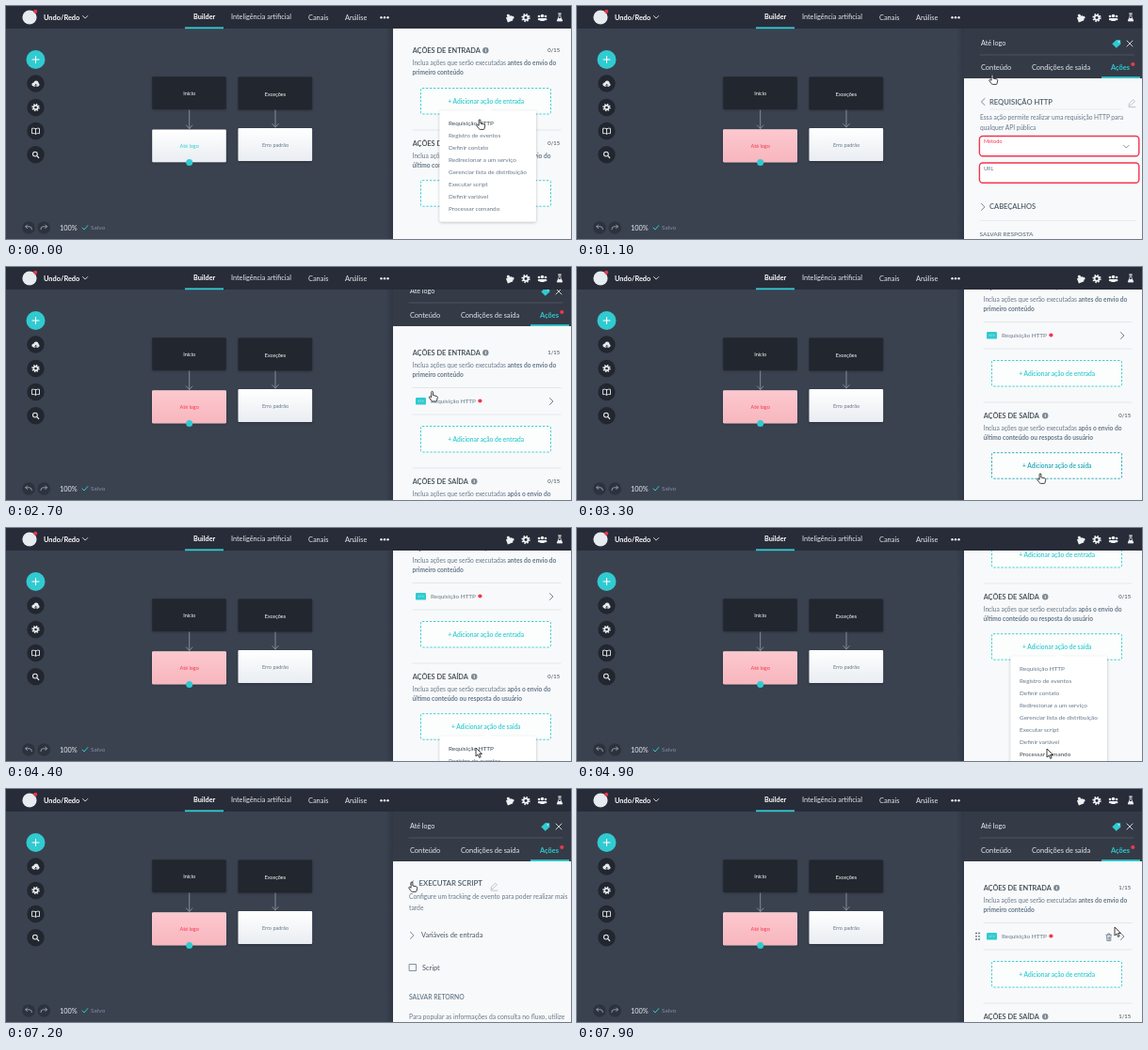
Write an HTML page that moves like this. It is 600 px wide and 248 px high and loops after 8 s.

```html
<!DOCTYPE html>
<html lang="pt-BR">
<head>
<meta charset="utf-8">
<title>Builder</title>
<style>
  html, body { margin: 0; width: 100%; height: 100%; overflow: hidden; background: #3a4250; }
  svg { display: block; width: 600px; height: 248px; }
  text { font-family: Lato, "Open Sans", sans-serif; white-space: pre; }
  .line { fill: none; stroke-linecap: round; stroke-linejoin: round; }
</style>
</head>
<body>
<svg id="stage" viewBox="0 0 600 248" xmlns="http://www.w3.org/2000/svg"></svg>
<script>
const TEAL = '#30cbd0', RED = '#f2364f', INK = '#39464f', GREY = '#66788a',
      CANVAS = '#3a4250', BAR = '#282c38', DARK = '#22262f', PAPER = '#f8f9fa', RULE = '#dde3e8';
const MENU = ['Requisição HTTP', 'Registro de eventos', 'Definir contato', 'Redirecionar a um serviço',
  'Gerenciar lista de distribuição', 'Executar script', 'Definir variável', 'Processar comando'];

// Drawing helpers; text is placed by its vertical centre.
const text = (x, y, s, size, fill, extra = '') =>
  `<text x="${x}" y="${y + size * 0.34}" font-size="${size}" fill="${fill}" ${extra}>${s}</text>`;
const BOLD = 'font-weight="700"', SEMI = 'font-weight="600"', MID = 'text-anchor="middle"', END = 'text-anchor="end"';
const rect = (x, y, w, h, fill, extra = '') =>
  `<rect x="${x}" y="${y}" width="${w}" height="${h}" fill="${fill}" ${extra}/>`;
const disc = (x, y, r, fill, extra = '') => `<circle cx="${x}" cy="${y}" r="${r}" fill="${fill}" ${extra}/>`;
const path = (d, stroke, w = 1, extra = '') =>
  `<path class="line" d="${d}" stroke="${stroke}" stroke-width="${w}" ${extra}/>`;
const group = (id, body, extra = '') => `<g id="${id}" ${extra}>${body}</g>`;
const right = (x, y, c = GREY) => path(`M${x - 1.5} ${y - 3.5}l3.5 3.5l-3.5 3.5`, c, 0.9);
const rule = y => path(`M432 ${y}H589`, RULE, 0.8);
const pencil = (x, y) => path(`M${x - 3} ${y + 3}l.6 -2.4l4 -4l1.8 1.8l-4 4zM${x - 3} ${y + 4.6}h7`, '#a3afb9', 0.7);

const gear = (x, y, r, c, hole) =>
  disc(x, y, r * 0.72, c) +
  disc(x, y, r * 0.76, 'none', `stroke="${c}" stroke-width="${r * 0.5}" stroke-dasharray="${r * 0.3} ${r * 0.297}"`) +
  disc(x, y, r * 0.32, hole);

function topBar() {
  const c = '#eef1f4';
  return rect(0, 0, 600, 24, BAR) +
    disc(25, 12, 7.6, '#e6ecef') + disc(31.2, 5.8, 2, RED) +
    text(40, 12, 'Undo/Redo', 7.4, '#fff', BOLD) +
    path('M81.5 10.5l2.6 2.6l2.6 -2.6', '#dfe4e8', 0.9) +
    text(199, 12, 'Builder', 7.3, '#fff', BOLD) +
    text(239, 12, 'Inteligência artificial', 7.3, '#e4e8ec') +
    text(321, 12, 'Canais', 7.4, '#e4e8ec') +
    text(360, 12, 'Análise', 7.4, '#e4e8ec') +
    [398.5, 402, 405.5].map(x => disc(x, 12.3, 1.2, c)).join('') +
    rect(190, 22.4, 41, 1.8, TEAL) +
    `<g transform="rotate(-20 535 13)">${rect(531.5, 10.8, 6, 5.6, c) + disc(534.4, 9.9, 1.6, c) + disc(538, 13.4, 1.6, c)}</g>` +
    gear(552, 12.5, 4.6, c, BAR) +
    disc(569.5, 10.5, 1.8, c) + disc(566, 11, 1.3, c) + disc(573, 11, 1.3, c) +
    rect(566.7, 13, 5.6, 3, c, 'rx="1.4"') + rect(564.8, 13, 9.6, 2.2, c, 'rx="1"') +
    path('M586.6 8h2.8M587.2 8v3l-2 5h5.6l-2 -5v-3', c, 0.8) +
    `<path d="M586.3 13h3.4l1.2 3h-5.8z" fill="${c}"/>`;
}

function toolBar() {
  const c = '#e6eaee';
  const round = y => disc(31.5, y, 9.2, DARK);
  return disc(31.5, 57, 10, TEAL) + path('M28 57h7M31.5 53.5v7', '#fff', 1.1) +
    [82.5, 108, 133, 158.3].map(round).join('') +
    disc(29.5, 83.5, 2.1, c) + disc(32, 82, 2.5, c) + disc(33.8, 83.8, 1.8, c) + rect(29.5, 83, 4.6, 2.6, c) +
    path('M31.7 86v-2.6M30.6 84.4l1.1 -1.1l1.1 1.1', DARK, 0.7) +
    gear(31.5, 108, 4.2, c, DARK) +
    path('M31.5 130.7v5.5M31.5 130.7q-2 -1 -4 -.4v5.4q2 -.6 4 .5q2 -1.1 4 -.5v-5.4q-2 -.6 -4 .4', c, 0.9) +
    disc(30.9, 157.6, 2.4, 'none', `stroke="${c}" stroke-width="1.1"`) + path('M32.9 159.7l1.8 1.8', c, 1.2) +
    disc(24, 236, 6.8, '#2d333e') + disc(40.3, 236, 6.8, '#2d333e') +
    path('M22.5 233l-1.7 1.8l1.7 1.8M21 234.8h4q2.4 0 2.4 2.9', '#aab4bd', 0.8) +
    path('M41.8 233l1.7 1.8l-1.7 1.8M43.3 234.8h-4q-2.4 0 -2.4 2.9', '#aab4bd', 0.8) +
    text(57, 236, '100%', 7.4, '#e8ecef') +
    path('M81 236l2 2l3.8 -4.4', TEAL, 1) +
    text(90, 236, 'Salvo', 6.5, '#8490a0');
}

function flow() {
  const box = (x, y, fill) => rect(x, y, 78.6, 34.9, fill, 'rx="1" filter="url(#soft)"');
  const arrow = (x, end) => path(`M${x} 111V${end - 1}M${x - 3.2} ${end - 4.5}l3.2 3.5l3.2 -3.5`, '#8b939f', 0.9);
  const label = (x, y, s, c) => text(x, y, s, 5.5, c, MID);
  return box(155.2, 75.2, DARK) + box(246.5, 75.6, DARK) +
    label(194.7, 93, 'Início', '#fff') + label(286, 94, 'Exceções', '#fff') +
    arrow(194.7, 131.5) + arrow(286, 130) +
    box(155.2, 131.4, 'url(#white)') + box(246.5, 130, 'url(#white)') +
    label(286, 147.8, 'Erro padrão', GREY) + label(194.7, 149.4, 'Até logo', TEAL) +
    group('invalid', rect(155.2, 131.4, 78.6, 34.9, 'url(#pink)', 'rx="1"') + label(194.7, 149.4, 'Até logo', RED)) +
    disc(194.7, 166.4, 3.5, TEAL);
}

const header = () => rect(411, 24, 189, 53, '#343b47') +
  text(429, 40, 'Até logo', 7.2, '#eef1f4') + path('M428 52H591', '#565f6c', 0.7) +
  `<path d="M568.3 40.2l4.6 -4.3l4.2 .4l.3 4.1l-4.7 4.4z" fill="${TEAL}"/>` + disc(575.4, 38, 0.8, '#fff') +
  path('M584 37l6 6M590 37l-6 6', '#dfe4e8', 0.9) +
  text(429, 65, 'Conteúdo', 7.4, '#e4e8ec') +
  text(483, 65, 'Condições de saída', 7.4, '#e4e8ec') +
  text(567, 65, 'Ações', 7.4, TEAL, BOLD) +
  disc(590.3, 62, 2.1, RED) + rect(557, 75.2, 41, 1.8, TEAL);

function section(key, y, title, infoX, lead, strong, second) {
  return text(431.7, y, title, 7.4, INK, SEMI) +
    disc(infoX, y + 0.2, 3.2, '#7c8a96') + rect(infoX - 0.4, y - 1.4, 0.9, 3.3, PAPER) +
    text(588, y, '0/15', 5.8, INK, `${END} id="${key}Count"`) +
    text(431.6, y + 13.4, `${lead}<tspan font-weight="700">${strong}</tspan>`, 6.6, GREY) +
    text(431.6, y + 23.5, second, 6.6, GREY, BOLD);
}

const addButton = (id, y, label) => group(id,
  rect(440.5, y, 138, 27.5, '#fcfdfd', `stroke="${TEAL}" stroke-width=".9" stroke-dasharray="2.4 1.6" rx="1.5"`) +
  text(509.7, y + 13.8, label, 6.6, TEAL, `${MID} ${SEMI}`));

const menu = (id, y) => group(id,
  rect(460.5, y + 24, 102.5, 118, '#fff', 'rx="2" filter="url(#soft)"') +
  `<path d="M507 ${y + 24.4}l4.5 -4.4l4.5 4.4z" fill="#fff"/>` +
  MENU.map((s, i) => text(470, y + 37.4 + i * 12.95, s, 6.4, GREY)).join(''));

const list = () =>
  section('in', 105, 'AÇÕES DE ENTRADA', 509.3, 'Inclua ações que serão executadas ', 'antes do envio do', 'primeiro conteúdo') +
  group('item',
    rule(142.5) + rule(171) +
    rect(435, 153, 11, 7.6, TEAL, 'rx="1.2"') + text(440.5, 156.7, '&lt;/&gt;', 4, '#fff', MID) +
    text(451, 156.4, 'Requisição HTTP', 6.4, GREY) + disc(503.4, 156.5, 2.1, RED) + right(579, 157) +
    group('hover',
      [424, 427].map(x => [153.5, 156.8, 160].map(y => disc(x, y, 0.9, '#596874')).join('')).join('') +
      path('M561.8 155.3h6M563.7 155v-1h2.2v1M562.6 156.4l.3 5.2h3.8l.3 -5.2M564.1 157.4v3M565.6 157.4v3', GREY, 0.8))) +
  group('rest',
    addButton('inAdd', 183.5, '+ Adicionar ação de entrada') +
    rule(228) +
    section('out', 242, 'AÇÕES DE SAÍDA', 497.2, 'Inclua ações que serão executadas ', 'após o envio do', 'último conteúdo ou resposta do usuário') +
    addButton('outAdd', 281.7, '+ Adicionar ação de saída') +
    menu('inMenu', 183.5) + menu('outMenu', 281.7));

const back = y => path(`M433 ${y - 3.5}l-3.6 3.5l3.6 3.5`, GREY, 0.9);
const field = y => rect(427.4, y, 169.4, 21.2, '#fff', `rx="3.5" stroke="${RED}" stroke-width="1.4"`);

const httpForm = () => back(102) +
  text(438, 102, 'REQUISIÇÃO HTTP', 7.6, '#4a5966', SEMI) + pencil(589, 103) +
  path('M438 110H578', RULE, 0.6) +
  text(428, 119, 'Essa ação permite realizar uma requisição HTTP para', 6.6, GREY) +
  text(428, 129.3, 'qualquer API pública', 6.6, GREY) +
  field(138.5) + text(432, 144, 'Método', 5.6, RED) + path('M580.5 148.2l2.8 2.8l2.8 -2.8', GREY, 0.8) +
  field(167) + text(432, 173, 'URL', 5.6, GREY) +
  right(431, 213.8) + text(438, 213.8, 'CABEÇALHOS', 7.5, '#4a5966', SEMI) +
  path('M428 228.5H593', RULE, 0.6) +
  text(427.5, 242.5, 'SALVAR RESPOSTA', 6.5, GREY, SEMI);

const scriptForm = () => back(101) +
  text(438.5, 100.6, 'EXECUTAR SCRIPT', 7.8, '#4a5966', SEMI) + pencil(518, 103.5) +
  text(428, 115.2, 'Configure um tracking de evento para poder realizar mais', 6.75, GREY) +
  text(428, 126.7, 'tarde', 6.75, GREY) +
  right(431, 155.8) + text(441, 155.8, 'Variáveis de entrada', 7.4, '#4a5966') +
  path('M428.5 186.5h7v7h-7z', GREY, 0.8) + text(442, 190, 'Script', 7.4, '#4a5966') +
  text(428, 221.5, 'SALVAR RETORNO', 6.8, GREY, SEMI) +
  text(428, 243, 'Para popular as informações da consulta no fluxo, utilize', 6.75, GREY);

const cursors = () => group('cursor',
  group('arrow', '<path d="M0 0v9l2.1 -1.9l1.5 3.3l1.5 -.7l-1.5 -3.2h2.8z" fill="#fff" stroke="#111" stroke-width=".8"/>') +
  group('hand', '<path d="M-.9 1q0 -1.2 .9 -1.2t.9 1.2v3l4 .9q.9 .4 .8 1.4l-.7 3.3q-.2 .8 -1 .8h-3.5q-.8 0 -1.3 -.7l-2.3 -3.2q-.4 -1 .5 -1.2q.6 0 1.7 1z" fill="#fff" stroke="#111" stroke-width=".8"/>'));

document.getElementById('stage').innerHTML = `<defs>
  <filter id="soft" x="-20%" y="-20%" width="140%" height="150%"><feDropShadow dx="0" dy="1" stdDeviation="1.6" flood-opacity=".25"/></filter>
  <linearGradient id="white" x2="0" y2="1"><stop stop-color="#fff"/><stop offset="1" stop-color="#e9edf1"/></linearGradient>
  <linearGradient id="pink" x2="0" y2="1"><stop stop-color="#fcc8ce"/><stop offset="1" stop-color="#f8b6be"/></linearGradient>
  <linearGradient id="edge"><stop stop-color="#1c2029" stop-opacity="0"/><stop offset="1" stop-color="#1c2029" stop-opacity=".3"/></linearGradient>
  <clipPath id="below"><rect x="411" y="24" width="189" height="224"/></clipPath></defs>` +
  rect(0, 0, 600, 248, CANVAS) + flow() + toolBar() + rect(403, 24, 8, 224, 'url(#edge)') +
  group('panel', rect(411, 24, 189, 224, PAPER) +
    group('list', list()) + group('http', httpForm()) + group('script', scriptForm()) +
    group('header', header()), 'clip-path="url(#below)"') +
  topBar() + cursors();

const el = {};
document.querySelectorAll('[id]').forEach(n => el[n.id] = n);

// Tables of [time, value, ...]; times in ms.
const LOOP = 8000;
const TRACKS = {
  cursor: [[0, 503, 121], [300, 503, 121], [1000, 442, 72], [1100, 441, 73], [1800, 431, 102], [2200, 430.5, 102.5],
    [2600, 446, 118], [3300, 492, 220], [3700, 492, 220], [4500, 500, 236], [4900, 499, 235], [5200, 490, 212],
    [5600, 490, 212], [6000, 473.5, 123.5], [6300, 446, 108], [6800, 431, 99], [7400, 431, 99], [7900, 571, 147]],
  scroll: [[0, 58], [300, 58], [400, 0], [2600, 0], [3200, 84], [4500, 84], [4900, 169], [5500, 169], [5600, 0]],
  list: [[400, 1], [700, 0], [2000, 0], [2500, 1], [5900, 1], [6300, 0], [7200, 0], [7600, 1]],
  http: [[400, 0], [800, 1], [2100, 1], [2500, 0]],
  script: [[5800, 0], [6200, 1], [7300, 1], [7700, 0]],
  invalid: [[400, 0], [800, 1]],
  inMenu: [[200, 1], [400, 0]],
  outMenu: [[3800, 0], [4000, 1], [5500, 1], [5600, 0]]
};
const ARROWS = [[1900, 2700], [4200, 5000], [7500, 8000]];

function at(track, t) {
  const i = track.findIndex(k => k[0] > t);
  if (i === 0) return track[0].slice(1);
  if (i < 0) return track[track.length - 1].slice(1);
  const a = track[i - 1], b = track[i], p = (t - a[0]) / (b[0] - a[0]);
  return a.slice(1).map((v, j) => v + (b[j + 1] - v) * p);
}
const show = (node, on) => node.setAttribute('display', on ? 'inline' : 'none');
const move = (node, x, y) => node.setAttribute('transform', `translate(${x} ${y})`);
function fade(name, t) {
  const [v] = at(TRACKS[name], t);
  el[name].setAttribute('opacity', v);
  show(el[name], v > 0);
  return v;
}
function form(name, t, originY) {
  const s = 0.92 + 0.08 * fade(name, t);
  el[name].setAttribute('transform', `translate(597 ${originY}) scale(${s}) translate(-597 ${-originY})`);
}

function render(t) {
  const [x, y] = at(TRACKS.cursor, t), [scroll] = at(TRACKS.scroll, t), added = t >= 700;
  move(el.cursor, x, y);
  const arrow = ARROWS.some(([a, b]) => t >= a && t < b);
  show(el.arrow, arrow);
  show(el.hand, !arrow);

  move(el.header, 0, -scroll);
  move(el.list, 0, -scroll);
  move(el.rest, 0, added ? 0 : -38);
  show(el.item, added);
  show(el.hover, t >= 7700);
  ['list', 'invalid', 'inMenu', 'outMenu'].forEach(name => fade(name, t));
  form('http', t, 150);
  form('script', t, 110);
  el.inCount.textContent = added ? '1/15' : '0/15';
  el.outCount.textContent = t >= 5600 ? '1/15' : '0/15';

  const hot = t >= 3200 && t < 3900 ? '#1fa5b5' : TEAL;
  el.outAdd.firstChild.setAttribute('stroke', hot);
  el.outAdd.lastChild.setAttribute('fill', hot);
  for (const m of [el.inMenu, el.outMenu])
    m.querySelectorAll('text').forEach(n => {
      const top = +n.getAttribute('y') - 2 - scroll - (added ? 0 : 38);
      n.setAttribute('fill', Math.abs(top - y - 2) < 6 ? INK : GREY);
    });
}

const start = performance.now();
function tick() {
  const t = (performance.now() - start) % LOOP;
  render(Math.floor(t / 100) * 100);
  requestAnimationFrame(tick);
}
tick();
</script>
</body>
</html>
```
